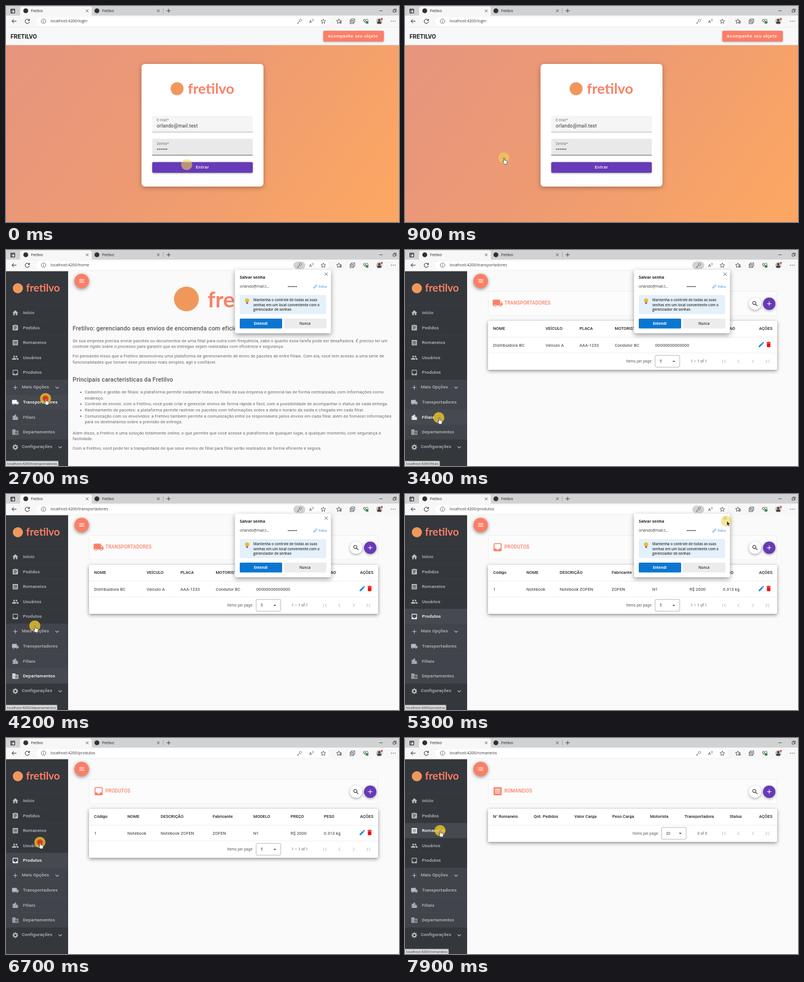
These frames come from a looping animation (696x384 px, 8000 ms). An HTML page with a canvas:

```html
<!DOCTYPE html>
<html lang="pt-BR">
<head>
<meta charset="utf-8">
<title>Fretilvo</title>
<style>
html, body { margin: 0; width: 100%; height: 100%; overflow: hidden; background: #fafafa; }
canvas { display: block; width: 696px; height: 384px; }
</style>
</head>
<body>
<canvas id="stage"></canvas>
<script>
const LOOP = 8000, W = 696, H = 384, TOP = 37.4;
const canvas = document.getElementById('stage');
const dpr = window.devicePixelRatio || 1;
canvas.width = W * dpr;
canvas.height = H * dpr;
const ctx = canvas.getContext('2d');

const APP = 'Roboto, sans-serif', UI = '"Open Sans", sans-serif', BRAND = 'Lato, sans-serif';
const CORAL = '#fb7f66', MARK = '#f0985c', PURPLE = '#673ab7', INK = '#2b2b2b', DIM = '#b9bbbd';

// Icons on a 24-unit grid, filled even-odd.
const icons = {
  home: 'M10 20v-6h4v6h5v-8h3L12 3 2 12h3v8z',
  clip: 'M19 3h-4.2a3 3 0 0 0-5.6 0H5a2 2 0 0 0-2 2v14a2 2 0 0 0 2 2h14a2 2 0 0 0 2-2V5a2 2 0 0 0-2-2zM12 3a1 1 0 1 1 0 2 1 1 0 0 1 0-2zM7 7h10v2H7zM7 11h10v2H7zM7 15h7v2H7z',
  sheet: 'M3 3h18v18H3zM6 7h12v2H6zM6 11h12v2H6zM6 15h12v2H6z',
  people: 'M16 11a3 3 0 1 0 0-6 3 3 0 0 0 0 6zM8 11a3 3 0 1 0 0-6 3 3 0 0 0 0 6zM8 13c-2.3 0-7 1.2-7 3.5V19h14v-2.5C15 14.2 10.3 13 8 13zM16 13l-1 .1c1.2.8 2 1.9 2 3.4V19h6v-2.5c0-2.3-4.7-3.5-7-3.5z',
  inbox: 'M19 3H5a2 2 0 0 0-2 2v14a2 2 0 0 0 2 2h14a2 2 0 0 0 2-2V5a2 2 0 0 0-2-2zm0 12h-4a3 3 0 0 1-6 0H5V5h14z',
  plus: 'M19 13h-6v6h-2v-6H5v-2h6V5h2v6h6z',
  truck: 'M20 8h-3V4H3a2 2 0 0 0-2 2v11h2a3 3 0 0 0 6 0h6a3 3 0 0 0 6 0h2v-5zM6 18.5a1.5 1.5 0 1 1 0-3 1.5 1.5 0 0 1 0 3zM19.5 9.5l2 2.5H17V9.5zM18 18.5a1.5 1.5 0 1 1 0-3 1.5 1.5 0 0 1 0 3z',
  city: 'M15 11V5l-3-3-3 3v2H3v14h18V11zM5 9h2v2H5zM5 13h2v2H5zM5 17h2v2H5zM11 5h2v2h-2zM11 9h2v2h-2zM11 13h2v2h-2zM11 17h2v2h-2zM17 13h2v2h-2zM17 17h2v2h-2z',
  office: 'M12 7V3H2v18h20V7zM4 5h2v2H4zM8 5h2v2H8zM4 9h2v2H4zM8 9h2v2H8zM4 13h2v2H4zM8 13h2v2H8zM4 17h2v2H4zM8 17h2v2H8zM12 9h8v10h-8zM14 11h4v2h-4zM14 15h4v2h-4z',
  down: 'M16.6 8.6 12 13.2 7.4 8.6 6 10l6 6 6-6z',
  menu: 'M3 6h18v2H3zM3 11h18v2H3zM3 16h18v2H3z',
  search: 'M15.5 14h-.8l-.3-.3A6.5 6.5 0 1 0 13.7 14.4l.3.3v.8l5 5 1.5-1.5zM9.5 14a4.5 4.5 0 1 1 0-9 4.5 4.5 0 0 1 0 9z',
  edit: 'M3 17.2V21h3.8L17.8 9.9l-3.7-3.7zM20.7 7a1 1 0 0 0 0-1.4l-2.3-2.3a1 1 0 0 0-1.4 0l-1.9 1.8 3.8 3.8z',
  trash: 'M6 19a2 2 0 0 0 2 2h8a2 2 0 0 0 2-2V7H6zM19 4h-3.5l-1-1h-5l-1 1H5v2h14z',
  prev: 'M15.4 7.4 14 6l-6 6 6 6 1.4-1.4L10.8 12z',
  next: 'M10 6 8.6 7.4 13.2 12l-4.6 4.6L10 18l6-6z',
  first: 'M18.4 16.6 13.8 12l4.6-4.6L17 6l-6 6 6 6zM6 6h2v12H6z',
  last: 'M5.6 7.4 10.2 12l-4.6 4.6L7 18l6-6-6-6zM16 6h2v12h-2z',
  gear: gearPath()
};
for (const k in icons) icons[k] = new Path2D(icons[k]);

function gearPath() {
  let d = '';
  for (let i = 0; i < 32; i++) {
    const a = (i - .5) * Math.PI / 16, r = i % 4 < 2 ? 10 : 7.2;
    d += (i ? 'L' : 'M') + (12 + r * Math.cos(a)).toFixed(2) + ' ' + (12 + r * Math.sin(a)).toFixed(2);
  }
  return d + 'zM12 8.5a3.5 3.5 0 1 0 0 7 3.5 3.5 0 0 0 0-7z';
}

// --- drawing helpers ---
function text(s, x, y, size, color = INK, { w = 400, f = APP, ls = .0179, align = 'left' } = {}) {
  ctx.font = `${w} ${size}px ${f}`;
  ctx.letterSpacing = (f === APP ? ls * size : 0) + 'px';
  ctx.textAlign = align;
  ctx.fillStyle = color;
  ctx.fillText(s, x, y + size * .355);
}
const ui = (s, x, y, size, color, w = 400, align = 'left') => text(s, x, y, size, color, { w, f: UI, align });

function box(x, y, w, h, color, r = 0) {
  ctx.fillStyle = color;
  ctx.beginPath();
  ctx.roundRect(x, y, w, h, r);
  ctx.fill();
}
function disc(x, y, r, color) {
  ctx.fillStyle = color;
  ctx.beginPath();
  ctx.arc(x, y, r, 0, 7);
  ctx.fill();
}
function line(color, width, ...p) {
  ctx.strokeStyle = color;
  ctx.lineWidth = width;
  ctx.beginPath();
  for (let i = 0; i < p.length; i += 2) ctx.lineTo(p[i], p[i + 1]);
  ctx.stroke();
}
function outline(path, x, y, color, width = .8) {
  ctx.save();
  ctx.translate(x, y);
  ctx.strokeStyle = color;
  ctx.lineWidth = width;
  ctx.stroke(new Path2D(path));
  ctx.restore();
}
function icon(name, x, y, size, color) {
  ctx.save();
  ctx.translate(x - size / 2, y - size / 2);
  ctx.scale(size / 24, size / 24);
  ctx.fillStyle = color;
  ctx.fill(icons[name], 'evenodd');
  ctx.restore();
}
function raised(blur, dy, alpha, draw) {
  ctx.save();
  ctx.shadowColor = `rgba(0,0,0,${alpha})`;
  ctx.shadowBlur = blur * dpr;
  ctx.shadowOffsetY = dy * dpr;
  draw();
  ctx.restore();
}

// --- timeline ---
const at = (list, t) => list.reduce((v, e) => t >= e[0] ? e[1] : v, list[0][1]);
const pageAt = [[0, 'login'], [1000, 'home'], [2900, 'transportadores'], [4500, 'produtos'], [6850, 'usuarios'], [7850, 'romaneios']];
const litAt = [[0, ''], [2350, 'Transportadores'], [3250, 'Filiais'], [3650, 'Departamentos'], [4350, 'Produtos'], [6800, 'Usuários'], [7350, 'Romaneios']];
const statusAt = [[0, ''], [2350, 'transportadores'], [3250, 'filiais'], [3650, 'departamentos'], [4350, 'produtos'], [5450, ''], [6800, 'usuarios'], [7350, 'romaneios']];
const clicks = [1750, 2720, 4400, 5480, 6700, 7650];
const POPUP = [1000, 5550], OPEN = 1850;
const path = [
  [0, 320, 282], [400, 320, 282], [1300, 72, 261], [1650, 60, 244], [2000, 60, 244], [2500, 70, 264],
  [2850, 70, 264], [3350, 60, 297], [3750, 58, 323], [3950, 57, 321], [4200, 51, 234.5], [4380, 48, 218],
  [4650, 48, 218], [5300, 569, 48], [5450, 567, 43], [5650, 567, 43], [6550, 60, 185.5],
  [6950, 60, 185.5], [7350, 62, 164.5], [LOOP, 62, 164.5]
];
const ease = u => u * u * (3 - 2 * u);
function pointer(t) {
  const i = Math.max(1, path.findIndex(p => p[0] > t));
  const [t0, x0, y0] = path[i - 1], [t1, x1, y1] = path[i];
  const k = ease((t - t0) / (t1 - t0));
  return [x0 + (x1 - x0) * k, y0 + (y1 - y0) * k];
}

// --- browser frame ---
function browser(page, popup) {
  box(0, 0, W, 17.5, '#d0d2d3');
  box(0, 17, W, TOP - 17, '#f7f7f7');
  box(25, 1, 127, 18, '#f7f7f7', [4, 4, 0, 0]);
  outline('M.5.5h7v7h-7zM.5 2.2h7M2.6 2.5v5', 8, 5, '#222', 1);
  for (const x of [35, 161]) {
    disc(x, 8.5, 4.3, '#2e3033');
    ui('Fretilvo', x + 9.2, 8.5, 6.2, '#222');
    line('#333', .8, x + 106.5, 6.3, x + 111, 10.8);
    line('#333', .8, x + 106.5, 10.8, x + 111, 6.3);
  }
  line('#999', .7, 278.5, 4, 278.5, 13);
  line('#333', .9, 284.5, 8.5, 291.5, 8.5);
  line('#333', .9, 288, 5, 288, 12);
  line('#444', .8, 661, 8.5, 667, 8.5);
  outline('M.5 2h4v4h-4zM2 2V.5h4.2v4.2H4.7', 685, 5, '#333');
  outline('M9 4H1M4.5.5 1 4l3.5 3.5', 9.5, 23, '#222', 1);
  outline('M7.6 2.4A3.8 3.8 0 1 0 8 5M8 .2v2.6H5.4', 33.5, 23, '#222', 1);
  box(54, 20, 518, 15, '#fff', 7);
  outline('M4 0a4 4 0 1 0 .01 0M4 3.5v2.8M4 1.8v.9', 62.5, 23, '#555', .8);
  ui('localhost:4200/' + page, 79, 27, 6.95, '#3a3a3a');
  if (popup) box(509, 20.5, 21, 13.5, '#d2d2d2', 7);
  outline('M5.5 0a2 2 0 1 0 .01 0M4 3.2 0 7.2h2V6', 516, 23.5, '#555', .8);
  ui('A', 537, 27.5, 7, '#333');
  outline('M0 0q1.5 1.5 0 3M1.5-1q2.5 2.5 0 5', 542, 23.5, '#555', .6);
  const star = 'M4 0 5.2 2.8 8.2 3 5.9 5 6.6 8 4 6.4 1.4 8 2.1 5-.2 3 2.8 2.8z';
  outline(star, 558, 23, '#444');
  outline(star, 585.5, 23, '#333');
  line('#333', .8, 591, 28, 595, 28);
  line('#333', .8, 591, 30, 595, 30);
  outline('M2 0h6v6H2zM2 2H0v6.3h6V6M5 1.5v3M3.5 3h3', 609.5, 23, '#333');
  outline('M4 7.5 0 3.5Q0 0 2.5.5L4 2 5.5.5Q8.5 0 8 4M1 4h2l1-1.3L5.2 5', 633, 23, '#333');
  box(637, 27, 5, 4.5, '#2e8b45', 2);
  disc(661, 27, 5.5, '#c9c5c3');
  disc(661, 25.2, 2.1, '#463d3b');
  box(657.3, 27.6, 7.4, 4, '#463d3b', [3.5, 3.5, 2, 2]);
  disc(665.6, 23, 1.7, '#d93a3a');
  for (const x of [682.5, 685.8, 689.1]) disc(x, 27, .75, '#333');
}

// --- pages ---
function login() {
  const g = ctx.createLinearGradient(70, 20, 610, 420);
  g.addColorStop(0, '#e7957d');
  g.addColorStop(.5, '#ee9b72');
  g.addColorStop(1, '#fca663');
  box(0, TOP, W, H - TOP, g);
  box(0, TOP, W, 69.5 - TOP, '#f7f8fa');
  line('#dcd6d4', .6, 0, 69.3, W, 69.3);
  text('FRETILVO', 8, 54, 10.5, '#222', { w: 700, ls: 0 });
  raised(3, 1, .35, () => box(562, 44, 107, 19, CORAL, 2));
  text('Acompanhe seu objeto', 570, 53.5, 7.35, '#fff', { w: 500, ls: .0893 });

  raised(8, 2, .3, () => box(240, 103, 216, 218, '#fff', 6));
  disc(303, 147, 11.5, MARK);
  text('fretilvo', 322, 147, 25.5, CORAL, { w: 700, f: BRAND });
  box(259, 195, 178, 29.5, '#f5f5f5', [2, 2, 0, 0]);
  line('#8d8d8d', .7, 259, 224.2, 437, 224.2);
  text('E-mail*', 267, 203, 6.3, '#777', { ls: .031 });
  text('orlando@mail.test', 267, 213.5, 8.4, '#333', { ls: .031 });
  box(259, 236, 178, 29.5, '#e9e9e9', [2, 2, 0, 0]);
  line('#333', .8, 259, 265.2, 437, 265.2);
  text('Senha*', 267, 244.5, 6.3, '#777', { ls: .031 });
  for (let i = 0; i < 6; i++) disc(268.5 + i * 3.2, 254.5, 1.05, '#333');
  raised(3, 1, .35, () => box(259, 277.5, 178, 19, PURPLE, 2));
  text('Entrar', 348, 286.5, 7.35, '#fff', { w: 500, ls: .0893, align: 'center' });
}

const para = [
  [118, 161, 'Se sua empresa precisa enviar pacotes ou documentos de uma filial para outra com frequência, sabe o quanto essa tarefa pode ser desafiadora. É preciso ter um'],
  [118, 171.5, 'controle rígido sobre o processo para garantir que as entregas sejam realizadas com eficiência e segurança.'],
  [118, 188.5, 'Foi pensando nisso que a Fretilvo desenvolveu uma plataforma de gerenciamento de envio de pacotes de entre filiais. Com ela, você tem acesso a uma série de'],
  [118, 199, 'funcionalidades que tornam esse processo mais simples, ágil e confiável.'],
  [139.5, 252.5, 'Cadastro e gestão de filiais: a plataforma permite cadastrar todas as filiais da sua empresa e gerenciá-las de forma centralizada, com informações como', 1],
  [139.5, 263, 'endereço.'],
  [139.5, 273.5, 'Controle de envios: com a Fretilvo, você pode criar e gerenciar envios de forma rápida e fácil, com a possibilidade de acompanhar o status de cada entrega.', 1],
  [139.5, 284.5, 'Rastreamento de pacotes: a plataforma permite rastrear os pacotes com informações sobre a data e horário da saída e chegada em cada filial.', 1],
  [139.5, 295, 'Comunicação com os envolvidos: a Fretilvo também permite a comunicação entre os responsáveis pelos envios em cada filial, além de fornecer informações', 1],
  [139.5, 305.5, 'para os destinatários sobre a previsão de entrega.'],
  [118, 325, 'Além disso, a Fretilvo é uma solução totalmente online, o que permite que você acesse a plataforma de qualquer lugar, a qualquer momento, com segurança e'],
  [118, 335.5, 'facilidade.'],
  [118, 352.5, 'Com a Fretilvo, você pode ter a tranquilidade de que seus envios de filial para filial serão realizados de forma eficiente e segura.']
];
function home() {
  disc(319.5, 87, 22, MARK);
  text('fretilvo', 357, 88, 38.5, CORAL, { w: 700, f: BRAND });
  const head = { w: 500, ls: .0125 };
  text('Fretilvo: gerenciando seus envios de encomenda com eficiência e segurança', 118, 139.7, 10.64, '#58585b', head);
  text('Principais características da Fretilvo', 118, 230.7, 10.64, '#58585b', head);
  for (const [x, y, s, dot] of para) {
    text(s, x, y, 7.5, '#69696d');
    if (dot) disc(132.5, y + .5, 1.2, '#69696d');
  }
}

const tables = {
  transportadores: {
    title: 'TRANSPORTADORES', icon: 'truck',
    cols: [[156, 'NOME'], [249, 'VEÍCULO'], [309, 'PLACA'], [371.5, 'MOTORISTA'], [443, 'CNPJ'], [537, 'OBSERVAÇAO']],
    rows: [['Distribuidora BC', 'Veículo A', 'AAA-1233', 'Condutor BC', '00000000000000']]
  },
  produtos: {
    title: 'PRODUTOS', icon: 'inbox',
    cols: [[156, 'Código'], [215, 'NOME'], [274, 'DESCRIÇÃO'], [366, 'Fabricante'], [438, 'MODELO'], [504, 'PREÇO'], [563, 'PESO']],
    rows: [['1', 'Notebook', 'Notebook ZOFEN', 'ZOFEN', 'N1', 'R$ 2000', '0.313 kg']]
  },
  usuarios: {
    title: 'USUÁRIOS', icon: 'people',
    cols: [[156, 'NOME'], [290, 'E-MAIL'], [438, 'FILIAL'], [535, 'PERFIL']],
    rows: [['Usuário 1', 'orlando@mail.test', 'Filial 1', 'Admin'], ['Usuário 2', 'usuario@mail.test', 'Filial 2', 'Comum']]
  },
  romaneios: {
    title: 'ROMANEIOS', icon: 'sheet', size: '20',
    cols: [[156, 'N° Romaneio'], [228, 'Qnt. Pedidos'], [300, 'Valor Carga'], [367, 'Peso Carga'], [434, 'Motorista'], [495, 'Transportadora'], [575, 'Status']],
    rows: []
  }
};
function table({ title, icon: glyph, cols, rows, size = '5' }) {
  box(147, 73, 511.5, 44, '#fcfcfc', 2);
  ctx.strokeStyle = '#ececec';
  ctx.lineWidth = .8;
  ctx.strokeRect(147.4, 73.4, 511, 43.5);
  icon(glyph, 164, 94.5, 19, CORAL);
  text(title, 176, 94.5, 8.4, CORAL, { w: 500 });
  raised(4, 1.5, .35, () => disc(620, 95.5, 11, '#fff'));
  icon('search', 620, 95.5, 12.5, '#222');
  raised(4, 1.5, .35, () => disc(645, 95.5, 11, PURPLE));
  icon('plus', 645, 95.5, 13, '#fff');

  const n = rows.length, bottom = 184.8 + 28.3 * n, y = bottom - 15;
  raised(6, 2, .45, () => box(147, 126, 512, bottom - 126, '#fff', 2));
  for (const [x, s] of [...cols, [627, 'AÇÕES']]) text(s, x, 139.5, 7.4, '#222', { w: 500, ls: .009 });
  line('#dedede', .6, 147, 155, 659, 155);
  rows.forEach((row, i) => {
    const ry = 169 + i * 28.3;
    row.forEach((s, c) => text(s, cols[c][0], ry, 7.45, '#333'));
    icon('edit', 631, ry - 1, 12.5, '#1387e0');
    icon('trash', 644, ry - 1, 12.5, '#ee1111');
    line('#e4e4e4', .6, 147, ry + 14, 659, ry + 14);
  });
  const sx = n ? 443 : 454.5;
  text('Items per page:', sx - 5, y, 6.3, '#555', { ls: .033, align: 'right' });
  ctx.strokeStyle = '#9a9a9a';
  ctx.lineWidth = .7;
  ctx.beginPath();
  ctx.roundRect(sx, y - 10.8, 43.6, 21, 2);
  ctx.stroke();
  text(size, sx + 8, y, 6.3, '#333');
  ctx.fillStyle = '#555';
  ctx.fill(new Path2D(`M${sx + 30.5} ${y - 1.2}h5l-2.5 2.6z`));
  text(n ? `1 – ${n} of ${n}` : '0 of 0', n ? 506 : 518, y, 6.3, '#555', { ls: .033 });
  ['first', 'prev', 'next', 'last'].forEach((k, i) => icon(k, 565 + i * 25.5, y, 13, '#c9c9c9'));
}

const mainItems = [['Início', 'home'], ['Pedidos', 'clip'], ['Romaneios', 'sheet'], ['Usuários', 'people'], ['Produtos', 'inbox']];
const moreItems = [['Transportadores', 'truck'], ['Filiais', 'city'], ['Departamentos', 'office']];
const STEP = 26.5;
function sidebar(t, lit) {
  const open = ease(Math.min(1, Math.max(0, (t - OPEN) / 225)));
  const extra = 3 * STEP * open;
  const label = (s, x, y, color) => text(s, x, y, 7.95, color, { w: 500, ls: .021 });
  const rule = y => line('rgba(255,255,255,.05)', .6, 0, y, 110, y);
  box(0, TOP, 110, H - TOP, '#34373c');
  disc(21, 68, 9, MARK);
  text('fretilvo', 35.5, 67.5, 18.6, CORAL, { w: 700, f: BRAND });
  if (open) box(0, 230.7, 110, STEP + extra, '#41444a');

  const item = ([name, glyph], y) => {
    const on = name === lit, color = on ? '#fff' : DIM;
    if (on) box(0, y - 13.2, 110, STEP, '#464950');
    icon(glyph, 16.5, y + .3, 12.6, color);
    label(name, 30, y - .2, color);
    rule(y + 13.2);
  };
  const group = (name, glyph, y, cx) => {
    icon(glyph, 16.5, y + .5, 12.6, DIM);
    label(name, 28, y - .5, DIM);
    icon('down', cx, y + .5, 13, '#c6c8ca');
  };
  rule(98);
  mainItems.forEach((it, i) => item(it, 111.5 + i * STEP));
  group('Mais Opções', 'plus', 244, 90.5);
  ctx.save();
  ctx.beginPath();
  ctx.rect(0, 257.3, 110, extra);
  ctx.clip();
  moreItems.forEach((it, i) => item(it, 270.5 + i * STEP));
  ctx.restore();
  group('Configurações', 'gear', 270.5 + extra, 96);
}

function passwordPopup() {
  raised(9, 3, .4, () => box(405.5, 35, 170, 113, '#fff', 3));
  ui('Salvar senha', 414, 48.5, 7.1, '#222', 700);
  line('#555', .8, 564, 40, 570, 46);
  line('#555', .8, 564, 46, 570, 40);
  ui('orlando@mail.t...', 414, 65, 6.6, '#333');
  for (let i = 0; i < 6; i++) disc(500.2 + i * 2.75, 65, 1, '#333');
  outline('M.5 6.5 1 4.5 5 .5 6.5 2 2.5 6z', 544.5, 61.3, '#2b7cd0', .8);
  ui('Edita', 554, 65, 6, '#2b7cd0');
  box(414, 80, 153, 34, '#e4f0fa', 2);
  disc(427, 89.7, 3.7, '#f6b632');
  box(425.4, 92.5, 3.2, 3.6, '#6d7b88', 1);
  ['Mantenha o controle de todas as suas', 'senhas em um local conveniente com o', 'gerenciador de senhas']
    .forEach((s, i) => ui(s, 438, 89 + i * 8.3, 6.2, '#333', 600));
  box(414, 122, 75, 17.5, '#0b76d1', 1.5);
  ui('Entendi', 451, 130.8, 6.3, '#fff', 700, 'center');
  box(492.5, 122, 75, 17.5, '#ececec', 1.5);
  ui('Nunca', 529.5, 130.8, 6.3, '#333', 600, 'center');
}

function cursor(t) {
  const [x, y] = pointer(t), side = x < 112;
  disc(x, y, 9.8, side ? 'rgba(238,198,42,.8)' : 'rgba(243,212,82,.58)');
  if (clicks.some(c => Math.abs(t - c) < 90)) {
    const g = ctx.createRadialGradient(x, y, 1, x, y, 7);
    g.addColorStop(0, '#e5261c');
    g.addColorStop(.55, '#e5401c');
    g.addColorStop(1, 'rgba(235,130,30,0)');
    disc(x, y, 7, g);
  }
  if (t < 400) return;
  const hand = side || t < 1000;
  const shape = new Path2D(hand
    ? 'M5 1.5c0-2 2.5-2 2.5 0V6l5 1.2c1.3.3 1.7 1 1.5 2.3l-.7 4c-.2 1-.7 1.5-.7 2.5H6.5c0-1-3.5-4-4-5.5-.4-1.3 1-1.7 1.7-1L5 10.5z'
    : 'M0 0v14l3.3-3 2.2 5 2.4-1-2.2-5H10z');
  ctx.save();
  ctx.translate(hand ? x - 4 : x + 1, y);
  ctx.scale(hand ? .72 : .6, hand ? .72 : .6);
  ctx.fillStyle = hand ? '#fff' : '#222';
  ctx.strokeStyle = hand ? '#222' : '#fff';
  ctx.lineWidth = 1;
  ctx.fill(shape);
  ctx.stroke(shape);
  ctx.restore();
}

function statusBar(page) {
  const s = 'localhost:4200/' + page;
  ctx.font = `400 6.05px ${UI}`;
  ctx.letterSpacing = '0px';
  const w = ctx.measureText(s).width + 4;
  box(0, 375, w, 9, '#d8d9da', [0, 2, 0, 0]);
  line('#a2a3a5', .7, 0, 375.2, w, 375.2, w, H);
  ui(s, 2, 380.2, 6.05, '#333');
}

function draw(t) {
  ctx.setTransform(dpr, 0, 0, dpr, 0, 0);
  box(0, 0, W, H, '#fafafa');
  const page = at(pageAt, t), status = at(statusAt, t);
  const popup = t >= POPUP[0] && t < POPUP[1];
  if (page === 'login') login();
  else {
    if (page === 'home') home();
    else table(tables[page]);
    sidebar(t, at(litAt, t));
    raised(6, 2, .45, () => disc(134, 55, 12.8, CORAL));
    icon('menu', 134, 55, 12, '#fff');
  }
  browser(page, popup);
  if (popup) passwordPopup();
  if (status) statusBar(status);
  cursor(t);
}

function tick() {
  draw(performance.now() % LOOP);
  requestAnimationFrame(tick);
}
tick();
</script>
</body>
</html>
```
